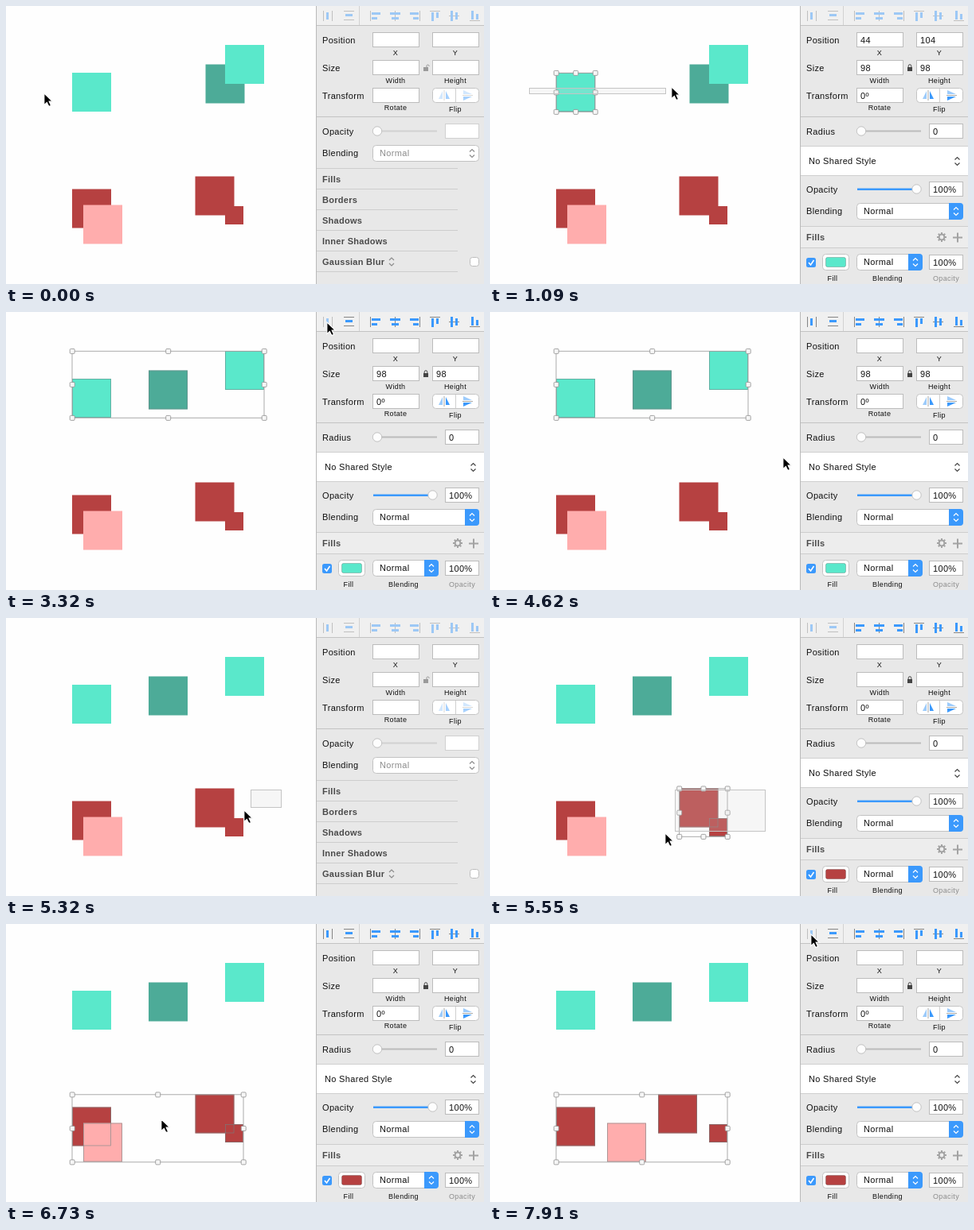
An HTML page for the animation above (8 s loop, 600 by 350 pixels).

```html
<!DOCTYPE html>
<html lang="en">
<head>
<meta charset="utf-8">
<title>Distribute layers</title>
<style>
  html, body { margin: 0; width: 100%; height: 100%; overflow: hidden; background: #fefefe; }
  svg { display: block; }
  text { font: 11px "Liberation Sans", Arial, sans-serif; letter-spacing: .33px; fill: #111; }
  .small { font-size: 9px; letter-spacing: .35px; text-anchor: middle; }
  .head { font-weight: bold; fill: #4a4a4a; letter-spacing: .28px; }
  .dim { fill: #8c8c8c; }
</style>
</head>
<body>
<svg id="stage" width="600" height="350" viewBox="0 0 600 350"></svg>
<script>
const LOOP = 8000;
const BLUE = '#3b99fc';

// Layers, back to front
const layer = (x, y, size, fill) => ({ x, y, size, fill });
const layers = {
  a: layer(83, 84, 49, '#5ae8cb'),
  b: layer(250.5, 73.5, 49, '#4dab98'),
  c: layer(275, 49, 49, '#5ae8cb'),
  d: layer(83, 230.5, 49, '#b64141'),
  e: layer(97, 250.5, 49, '#ffadad'),
  f: layer(237.5, 214.5, 49, '#b64141'),
  g: layer(275, 252, 23, '#b64141')
};
const moves = [
  { at: 3320, id: 'b', x: 179 },
  { at: 7910, id: 'e', x: 147 },
  { at: 7910, id: 'f', x: 211 }
];
const picks = [[0, ''], [845, 'a'], [1320, 'ab'], [1435, 'abc'], [4970, ''], [5425, 'fg'], [5890, 'defg']];
const presses = [[3320, 3440], [7910, 8000]];
const drags = [
  { from: 500, to: 2140, x: 49, y: 110 },
  { from: 4970, to: 6490, x: 345, y: 216 }
];

// Pointer runs: start, time of last step, points
const runs = [
  [500, 1200, [[48, 109], [58, 109], [92, 109], [142, 108], [191, 105], [227, 101], [247, 97]]],
  [1320, 1790, [[272, 92], [291, 87], [303, 83], [312, 80], [314, 79]]],
  [2380, 2850, [[330, 70], [360, 48], [386, 26], [399, 15], [402, 12]]],
  [4160, 4850, [[400, 30], [392, 75], [383, 120], [374, 156], [367, 182], [358, 196], [351, 203]]],
  [4970, 5660, [[343, 215], [338, 217], [325, 225], [298, 241], [263, 258], [219, 270], [180, 281]]],
  [5780, 6250, [[140, 290], [105, 299], [80, 306], [65, 309], [62, 310]]],
  [6490, 7200, [[85, 299], [140, 272], [194, 245], [245, 203], [300, 140], [345, 85], [374, 45]]],
  [7320, 7790, [[390, 25], [398, 17], [402, 13], [402, 12], [402, 12]]]
];
const trail = [{ at: 0, x: 47, y: 109 }];
for (const [from, to, points] of runs) {
  const gap = (to - from) / (points.length - 1);
  points.forEach(([x, y], i) => trail.push({ at: from + i * gap - .01, x, y }));
}

// Drawing helpers
const rect = (x, y, w, h, fill, more = '') =>
  `<rect x="${x}" y="${y}" width="${w}" height="${h}" fill="${fill}" ${more}/>`;
const frame = (x, y, w, h, stroke, fill = 'none', more = '') =>
  rect(x + .5, y + .5, w - 1, h - 1, fill, `stroke="${stroke}" ${more}`);
const text = (x, y, s, cls = '') => `<text x="${x}" y="${y}" class="${cls}">${s}</text>`;
const path = (d, stroke, width = 1, fill = 'none') =>
  `<path d="${d}" fill="${fill}" stroke="${stroke}" stroke-width="${width}"/>`;
const fade = (on, s) => `<g opacity="${on ? 1 : .45}">${s}</g>`;
const rule = (y, to = 600, color = '#c3c3c3') => rect(390, y, to - 390, 1, color);
const field = (x, y, w, value = '', border = '#bcbcbc') =>
  frame(x, y, w, 19, border, '#fff') + text(x + 5, y + 13.5, value);
const chevrons = (x, y, color) =>
  path(`M${x - 3} ${y - 2}l3-3 3 3M${x - 3} ${y + 2}l3 3 3-3`, color, 1.2);
const knob = (x, y) =>
  `<circle cx="${x}" cy="${y}" r="5.7" fill="#fdfdfd" stroke="#b5b5b5" stroke-width=".8"/>`;

function select(x, y, w, h, on) {
  const b = x + w - 18;
  return frame(x, y, w, h, '#c2c2c2', '#fff', 'rx="4"') +
    (on ? path(`M${b} ${y}h14q4 0 4 4v${h - 8}q0 4-4 4h-14z`, 'none', 0, BLUE) : '') +
    chevrons(b + 9, y + h / 2, on ? '#fff' : '#8c8c8c') +
    text(x + 9, y + h / 2 + 3.5, 'Normal', on ? '' : 'dim');
}

function toolbar(count, pressed) {
  const line = (x, y, w, h) => rect(x, y, w, h, '#858585');
  const bar = (x, y, w, h) => rect(x, y, w, h, BLUE);
  const sideways = line(398, 6, 1, 13) + line(409, 6, 1, 13) + bar(402, 8, 3, 9);
  const stacked = line(424, 6, 13, 1) + line(424, 17, 13, 1) + bar(426, 10, 9, 3);
  const align =
    line(457, 6, 1, 13) + bar(459, 8, 11, 3) + bar(459, 14, 7, 3) +
    line(488, 6, 1, 13) + bar(482, 8, 13, 3) + bar(484, 14, 9, 3) +
    line(519, 6, 1, 13) + bar(507, 8, 11, 3) + bar(511, 14, 7, 3) +
    line(532, 6, 13, 1) + bar(534, 8, 3, 11) + bar(540, 8, 3, 7) +
    line(556, 12, 13, 1) + bar(558, 6, 3, 13) + bar(564, 8, 3, 9) +
    line(582, 18, 13, 1) + bar(584, 6, 3, 11) + bar(590, 10, 3, 7);
  return rect(390, 0, 210, 24, '#f0f0f0') + rule(24) + rect(443, 0, 1, 24, '#d2d2d2') +
    fade(count > 2 && !pressed, sideways) + fade(count > 2, stacked) + fade(count > 1, align);
}

function lock(on) {
  const color = on ? '#444' : '#9a9a9a';
  return rect(524, 77, 6, 5, color) +
    path(on ? 'M525.2 77v-1.5a1.8 1.8 0 0 1 3.6 0v1.5' : 'M528 77v-2a1.6 1.6 0 0 1 3 0v1', color);
}

function geometry(sel) {
  const on = sel.length > 0, one = sel.length === 1 ? sel[0] : null;
  const same = on && sel.every(s => s.size === sel[0].size);
  const size = same ? sel[0].size * 2 : '';
  return text(397, 47, 'Position') + text(397, 82, 'Size') + text(397, 117, 'Transform') +
    field(460, 33, 59, one ? (one.x - 61) * 2 : '') +
    field(535, 33, 59, one ? (one.y - 32) * 2 : '') +
    field(460, 68, 59, size) + field(535, 68, 59, size) + lock(on) +
    field(460, 103, 59, on ? '0º' : '') +
    text(489, 62, 'X', 'small') + text(564, 62, 'Y', 'small') +
    text(489, 97, 'Width', 'small') + text(564, 97, 'Height', 'small') +
    text(489, 131, 'Rotate', 'small') + text(564, 133, 'Flip', 'small') +
    frame(535, 103, 59, 19, '#c4c4c4', '#fff', 'rx="4"') + rect(564, 104, 1, 17, '#cfcfcf') +
    fade(on, path('M548 107v10h-5z', 'none', 0, '#9ccbfb') + path('M552 107v10h5z', 'none', 0, BLUE) +
      rect(549.5, 106, 1, 13, '#a8a8a8') +
      path('M574 111v-5l11 5z', 'none', 0, '#9ccbfb') + path('M574 114v5l11-5z', 'none', 0, BLUE) +
      rect(573, 112, 13, 1, '#a8a8a8')) +
    rule(139);
}

function emptyPanel() {
  const heads = ['Fills', 'Borders', 'Shadows', 'Inner Shadows', 'Gaussian Blur'];
  return text(397, 162, 'Opacity') + rect(471, 156.5, 70, 2, '#d2d2d2') + knob(466, 157.5) +
    field(551, 148, 43, '', '#d0d0d0') +
    text(397, 189, 'Blending') + select(460, 175, 134, 21, false) +
    heads.map((s, i) => rule(204 + 26 * i, 567, '#cdcdcd') + text(397, 222 + 26 * i, s, 'head')).join('') +
    rule(334, 567, '#cdcdcd') + chevrons(484, 322, '#8c8c8c') +
    frame(582, 316, 12, 12, '#bdbdbd', '#fff', 'rx="3"');
}

function gear(x, y) {
  let teeth = '';
  for (let i = 0; i < 8; i++) {
    const a = i * Math.PI / 4, c = Math.cos(a), s = Math.sin(a);
    teeth += `M${x + 3.5 * c} ${y + 3.5 * s}L${x + 6 * c} ${y + 6 * s}`;
  }
  return path(teeth, '#a3a3a3', 2) +
    `<circle cx="${x}" cy="${y}" r="3.4" fill="none" stroke="#a3a3a3" stroke-width="2"/>`;
}

function fullPanel(fill) {
  return text(397, 162, 'Radius') + rect(471, 156.5, 70, 2, '#bcbcbc') + knob(466, 157.5) + field(551, 148, 43, '0') +
    rect(390, 177, 210, 36, '#fff') + rule(176, 600, '#cfcfcf') + rule(213, 600, '#cfcfcf') +
    text(400, 199, 'No Shared Style') + chevrons(586.5, 195.5, '#444') +
    text(397, 235, 'Opacity') + rect(461, 229.5, 72, 2.5, BLUE) + knob(535.5, 230.5) + field(551, 221, 43, '100%') +
    text(397, 262, 'Blending') + select(460, 248, 134, 21, true) +
    rect(390, 277, 210, 27, '#ededed') + rule(277, 600, '#cdcdcd') + rule(304, 600, '#cdcdcd') +
    text(397, 295, 'Fills', 'head') + gear(567, 291) + path('M581 291.5h12M587 285.5v12', '#a3a3a3', 2) +
    rect(397, 317, 12, 12, BLUE, 'rx="2.5"') + path('M400 323l2.5 3 4-6', '#fff', 1.6) +
    frame(417, 312, 34, 21, '#c4c4c4', '#fff', 'rx="4"') + frame(421, 316, 26, 13, '#0003', fill, 'rx="2"') +
    select(460, 312, 83, 21, true) + field(551, 313, 43, '100%') +
    text(430, 346, 'Fill', 'small') + text(499, 346, 'Blending', 'small') +
    text(572.5, 346, 'Opacity', 'small dim');
}

function selection(sel) {
  if (!sel.length) return '';
  const x0 = Math.min(...sel.map(s => s.x)), x1 = Math.max(...sel.map(s => s.x + s.size));
  const y0 = Math.min(...sel.map(s => s.y)), y1 = Math.max(...sel.map(s => s.y + s.size));
  const xs = [x0, (x0 + x1) / 2, x1], ys = [y0, (y0 + y1) / 2, y1];
  let out = sel.map(s => frame(s.x, s.y, s.size, s.size, '#6f8585', 'none', 'stroke-width=".7" opacity=".8"')).join('');
  out += rect(x0, y0 + .3, x1 - x0, y1 - y0, 'none', 'stroke="#a2a2a2" stroke-width=".9"');
  xs.forEach((x, i) => ys.forEach((y, j) => {
    if (i !== 1 || j !== 1) {
      out += rect(x - 2.8, y - 2.6, 6, 6, '#f6f6f6', 'rx="1.2" stroke="#8e8e8e" stroke-width=".8"');
    }
  }));
  return out;
}

// The corner trails a little behind the pointer
function marquee(t, now, before) {
  const drag = drags.find(d => t >= d.from && t < d.to);
  if (!drag) return '';
  const x = now.x + 2 + (before.x - now.x) / 4;
  const y = now.y + 1 + (before.y - now.y) / 4;
  const w = Math.abs(x - drag.x), h = Math.abs(y - drag.y);
  return rect(Math.round(Math.min(x, drag.x)) + .5, Math.round(Math.min(y, drag.y)) + .5,
    Math.round(w), Math.round(h), 'rgba(215,215,215,.2)', 'stroke="#c4c4c4"');
}

const pointer = p => `<g transform="translate(${p.x} ${p.y})">` +
  path('M.8.8V15.6L4.3 12.4 6.8 17.6 9.6 16.4 7.2 11.2H11.6Z', '#fff', 1.2, '#000') + '</g>';

function scene(t) {
  const place = id => {
    const move = moves.find(m => m.id === id && t >= m.at);
    return move ? { ...layers[id], x: move.x } : layers[id];
  };
  const ids = picks.filter(p => t >= p[0]).pop()[1];
  const sel = [...ids].map(place);
  const step = trail.filter(p => t >= p.at).length - 1;
  const now = trail[step], before = trail[Math.max(0, step - 1)];
  const pressed = presses.some(([from, to]) => t >= from && t < to);
  return rect(0, 0, 600, 350, '#fefefe') +
    Object.keys(layers).map(place).map(s => rect(s.x, s.y, s.size, s.size, s.fill)).join('') +
    selection(sel) + marquee(t, now, before) +
    rect(389, 0, 211, 350, '#e8e8e8') + rect(389, 0, 1, 350, '#b9b9b9') +
    toolbar(sel.length, pressed) + geometry(sel) +
    (sel.length ? fullPanel(sel[0].fill) : emptyPanel()) +
    pointer(now);
}

const stage = document.getElementById('stage');
const start = performance.now();
let shown = '';
function draw() {
  const next = scene((performance.now() - start) % LOOP);
  if (next !== shown) stage.innerHTML = shown = next;
  requestAnimationFrame(draw);
}
draw();
</script>
</body>
</html>
```
